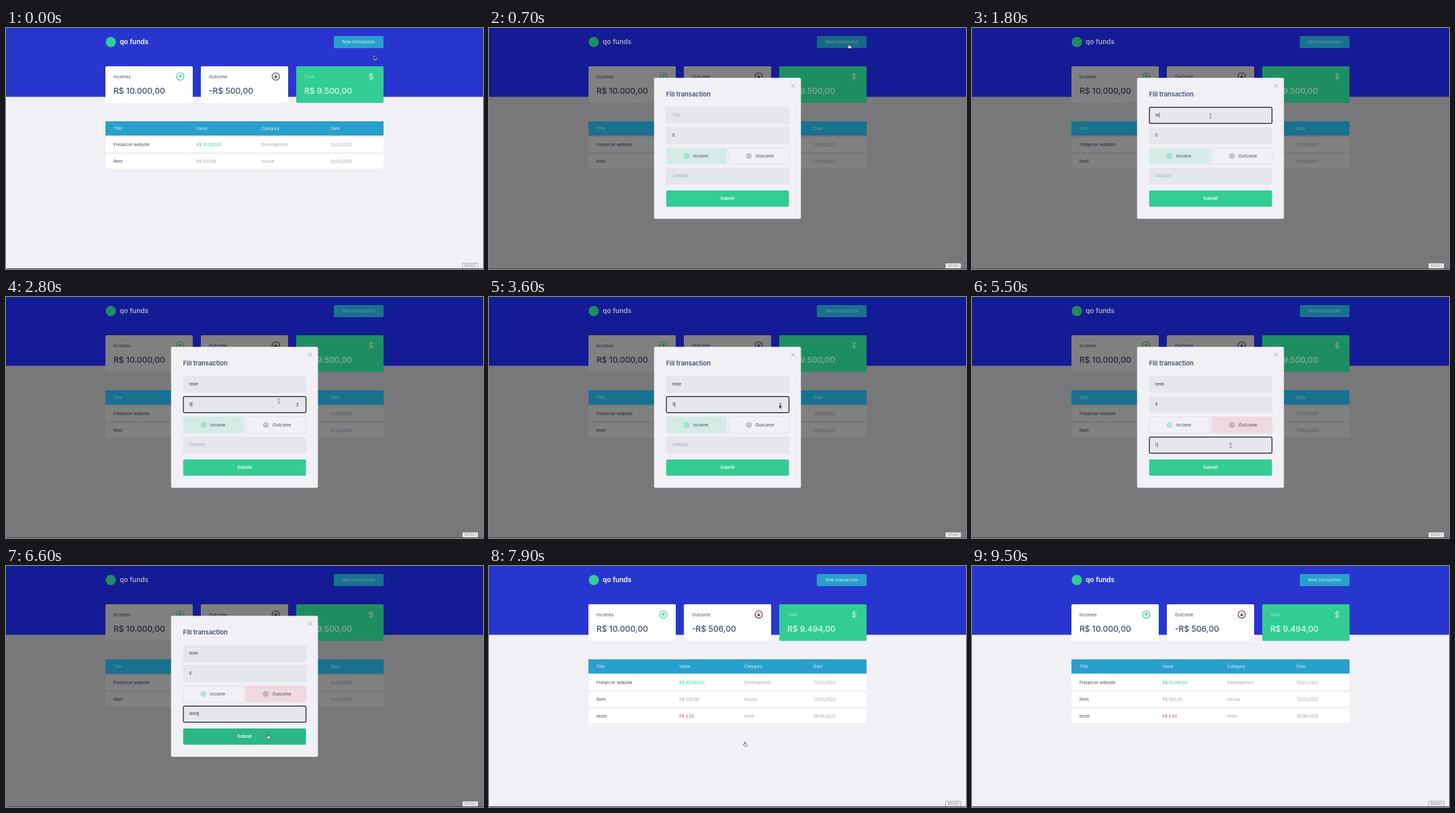
These frames come from a looping animation (710x359 px, 9.9 s). An HTML page:

```html
<!DOCTYPE html>
<html lang="en">
<head>
<meta charset="utf-8">
<title>Transactions</title>
<style>
html, body { margin: 0; width: 100%; height: 100%; overflow: hidden; background: #f0f0f5; }
svg { display: block; width: 710px; height: 359px; font-family: Inter, "Open Sans", sans-serif; }
</style>
</head>
<body>
<svg id="stage" viewBox="0 0 710 359"></svg>
<script>
const LOOP = 9900, OPEN = 700, CLOSE = 7900;
const stage = document.getElementById('stage');

const LIT = {
  page: '#f0f0f5', head: '#2936ce', blue: '#299fcd', green: '#33cc95', card: '#fff', ink: '#434b69',
  dim: '#a0a4b7', mint: '#33cc95', dark: '#40424f', bright: '#fff', soft: '#e0f7ee', faint: '#9de6cb', th: '#d5edf6'
};
const SHADED = {
  page: '#78787b', head: '#151b94', blue: '#18728f', green: '#1f8d62', card: '#808080', ink: '#22263a',
  dim: '#505260', mint: '#1a7054', dark: '#202128', bright: '#a9abba', soft: '#8aa79b', faint: '#379b76', th: '#7296a3'
};

// Pointer path: time, x, y, shape
const PATH = [
  [0, 547.5, 41, 'arrow'], [400, 535, 24, 'hand'], [700, 535, 24, 'hand'],
  [1400, 355, 131, 'beam'], [2200, 355, 131, 'beam'], [2700, 406, 155, 'beam'],
  [2900, 406, 155, 'beam'], [3600, 432, 160, 'arrow'], [4500, 432, 160, 'arrow'],
  [5000, 400, 191, 'hand'], [5300, 385, 221, 'beam'], [6000, 385, 221, 'beam'],
  [6600, 389, 251, 'hand'], [6700, 389, 251, 'hand'], [6900, 384, 258, 'hand'],
  [7100, 384, 258, 'hand'], [7300, 380, 262, 'hand']
];
const FOCUS = [[1400, 'title'], [2700, 'value'], [5000, ''], [5300, 'category'], [6900, '']];
const TITLE_KEYS = [1700, 1800, 2000, 2100, 2200];
const CATEGORY_KEYS = [5500, 5600, 5700, 5800, 6000];
const SPINS = [3800, 3900, 4100, 4200, 4300, 4500];

const passed = (times, t) => times.filter(k => k <= t).length;
const typed = (times, t) => 'teste'.slice(0, passed(times, t));

const rect = (x, y, w, h, fill, r = 0, extra = '') =>
  `<rect x="${x}" y="${y}" width="${w}" height="${h}" rx="${r}" fill="${fill}" ${extra}/>`;
const text = (x, y, s, fill, size = 6.3, weight = 400, anchor = 'start') =>
  `<text x="${x}" y="${y}" fill="${fill}" font-size="${size}" font-weight="${weight}" text-anchor="${anchor}">${s}</text>`;
const line = (d, color, w = 1) =>
  `<path d="${d}" fill="none" stroke="${color}" stroke-width="${w}" stroke-linecap="round" stroke-linejoin="round"/>`;

function arrowIcon(x, y, scale, up, color) {
  return `<g transform="translate(${x} ${y}) scale(${scale} ${up ? scale : -scale})">` +
    `<circle r="5.4" fill="none" stroke="${color}" stroke-width="1.1"/>` +
    line('M0 2.3V-2.3M-2.2 -.1L0 -2.3L2.2 -.1', color, 1.1) + '</g>';
}

function card(x, label, value, fill, labelColor, valueColor) {
  return rect(x, 57, 130, 54.5, fill, 1.8) + text(x + 12, 74.6, label, labelColor, 6.4) +
    text(x + 12, 98, value, valueColor, 12.1, 500);
}

function row(y, title, value, category, date, p, valueColor = p.dim) {
  return rect(148, y, 414, 21.8, p.card, 1.5) + text(160, y + 13.2, title, p.ink, 6.4) +
    text(283.3, y + 13.2, value, valueColor, 6) + text(380, y + 13.2, category, p.dim) +
    text(483, y + 13.2, date, p.dim, 6);
}

function page(t, p) {
  const done = t >= CLOSE;
  const hover = t >= 300 && t < 900;
  return rect(0, 0, 710, 359, p.page) + rect(0, 0, 710, 102.5, p.head) +
    `<circle cx="156" cy="20.8" r="7.6" fill="${p.green}"/>` +
    text(169.3, 24, 'qo funds', p.bright, 10, 600) +
    rect(488, 12, 74, 18, p.blue, 1.5, hover ? 'style="filter:brightness(.92)"' : '') +
    text(525, 23.2, 'New transaction', p.th, 6.4, 400, 'middle') +
    card(148, 'Incomes', 'R$ 10.000,00', p.card, p.ink, p.ink) + arrowIcon(259.5, 72.2, 1, true, p.mint) +
    card(290, 'Outcome', done ? '-R$ 506,00' : '-R$ 500,00', p.card, p.ink, p.ink) +
    arrowIcon(401.5, 72.2, 1, false, done ? '#562c3c' : p.dark) +
    card(432, 'Total', done ? 'R$ 9.494,00' : 'R$ 9.500,00', p.green, p.faint, p.soft) +
    line('M543.5 67V77.5M546.2 69H542.3a1.6 1.6 0 0 0 0 3.2h2.5a1.6 1.6 0 0 1 0 3.2h-4.2', p.soft, .9) +
    rect(148, 139, 414, 21.3, p.blue, .8) +
    [[160, 'Title'], [283.3, 'Value'], [380, 'Category'], [483, 'Date']]
      .map(([x, s]) => text(x, 151.6, s, p.th, 6.2)).join('') +
    row(163.1, 'Frelancer website', 'R$ 10.000,00', 'Development', '12/02/2022', p, p.mint) +
    row(187.7, 'Rent', 'R$ 500,00', 'House', '12/02/2022', p) +
    (done ? row(212.3, 'teste', 'R$ 6,00', 'teste', '18/08/2022', p, '#98687c') : '');
}

function field(y, value, hint, focused) {
  const border = focused ? 'stroke="#191a20" stroke-width="1.2"' : 'stroke="#d9d9df" stroke-width=".5"';
  const caret = 273.4 + value.length * (hint ? 2.6 : 3.4);
  return rect(264, y, 182.5, 24, '#e6e7ec', 1.8, border) +
    text(273, y + 13.6, value || (focused ? '' : hint), value ? '#30323c' : '#a3a5b0', 5.6) +
    (focused ? line(`M${caret} ${y + 8.4}v7`, '#22232a', .6) : '');
}

function choice(x, label, up, on) {
  const tint = up ? '#d6ebe6' : '#eed9df';
  return rect(x, 178.6, 89.8, 24.2, on ? tint : '#f0f0f5', 1.5, `stroke="${on ? tint : '#d5d5dc'}" stroke-width=".6"`) +
    arrowIcon(x + 30, 190.6, .64, up, up ? '#33cc95' : '#686a76') + text(x + 40, 192.7, label, '#434b69', 6.4);
}

function modal(t) {
  const focus = FOCUS.filter(f => f[0] <= t).pop()?.[1];
  const outcome = t >= 5000;
  return rect(245.7, 74.3, 218.6, 210, '#f0f0f5', 2) +
    line('M450.3 83.7l4.6 4.6m0-4.6l-4.6 4.6', '#969cab', .8) +
    text(263.5, 102.2, 'Fill transaction', '#434b69', 9.4, 600) +
    field(118.2, typed(TITLE_KEYS, t), 'Title', focus === 'title') +
    field(148.3, String(passed(SPINS, t)), '', focus === 'value') +
    (focus === 'value' ? '<path d="M432.2 159.4l1.7-2.2 1.7 2.2zM432.2 161.1h3.4l-1.7 2.2z" fill="#50525c"/>' : '') +
    choice(264, 'Income', true, !outcome) + choice(356.8, 'Outcome', false, outcome) +
    field(208.7, typed(CATEGORY_KEYS, t), 'Category', focus === 'category') +
    rect(263.7, 242, 182.8, 24.3, t >= 6500 ? '#2eb686' : '#33cc95', 1.8) +
    text(355, 256.2, 'Submit', '#f4fffb', 6.3, 600, 'middle');
}

const SHAPES = {
  arrow: '<path d="M0 0V6.4L1.5 5L2.5 7.2L3.5 6.8L2.5 4.6H4.5Z" fill="#111" stroke="#fff" stroke-width=".5"/>',
  hand: '<path d="M0 .3Q.6-.4 1.2.3V2.5L4 3.1Q4.6 3.4 4.4 4.5L3.8 6.6H.8L-1.5 4Q-1.3 3 0 3.9Z" fill="#fff" stroke="#222" stroke-width=".6"/>',
  beam: line('M-1.2 -3H1.2M0 -3V3M-1.2 3H1.2', '#555761', .6)
};

function pointer(t) {
  if (t >= 9500) return '';
  const i = PATH.findLastIndex(k => k[0] <= t);
  const a = PATH[i], b = PATH[i + 1] || a;
  const f = a === b ? 0 : (t - a[0]) / (b[0] - a[0]);
  const x = a[1] + (b[1] - a[1]) * f, y = a[2] + (b[2] - a[2]) * f;
  return `<g transform="translate(${x} ${y})">${SHAPES[f < .7 ? a[3] : b[3]]}</g>`;
}

function draw(t) {
  const open = t >= OPEN && t < CLOSE;
  stage.innerHTML = page(t, open ? SHADED : LIT) + (open ? modal(t) : '') + pointer(t) +
    rect(0, 358, 710, 1, '#4b4b50') +
    rect(679.5, 350.5, 23, 7.5, '#f4f4f6', .5, 'stroke="#8a8a90" stroke-width=".7"') +
    text(691, 356, '127.0.0.1', '#55555c', 4.5, 400, 'middle');
}

const start = performance.now();
let shown = -1;
function tick() {
  const t = Math.floor((performance.now() - start) % LOOP / 100) * 100;
  if (t !== shown) draw(shown = t);
  requestAnimationFrame(tick);
}
tick();
</script>
</body>
</html>
```
